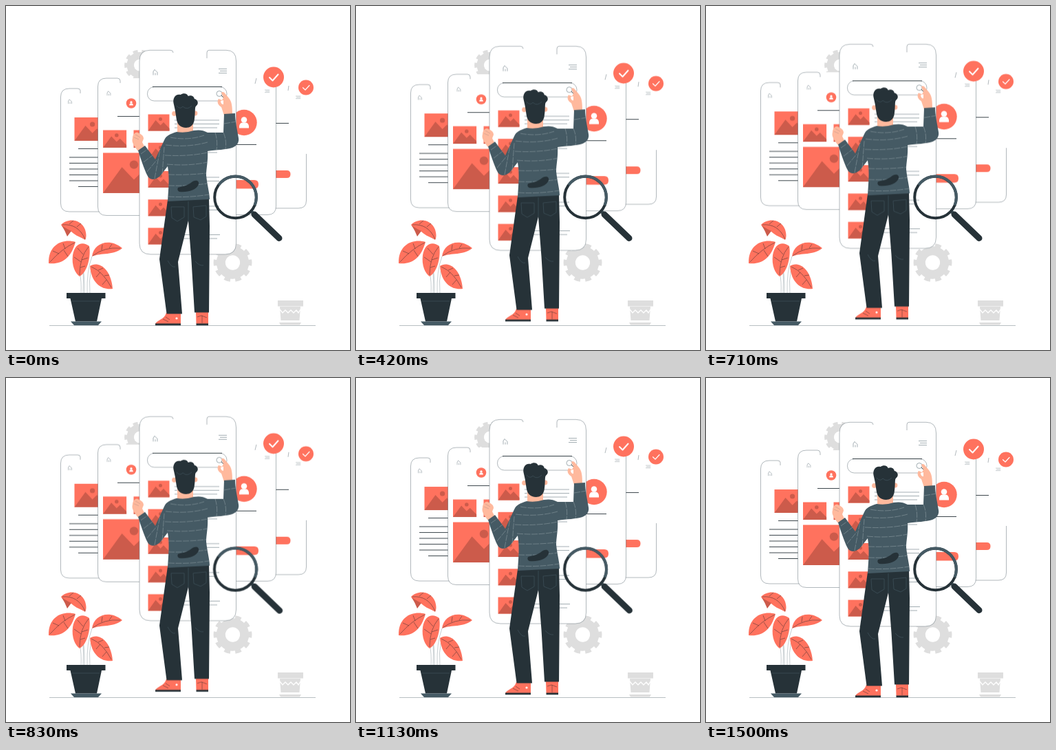
Animation of 500 by 500 pixels, one loop 1540 ms. Source, as an HTML page:

```html
<!DOCTYPE html>
<html lang="en">
<head>
<meta charset="utf-8">
<title>App screens</title>
<style>
  html, body { margin: 0; width: 100%; height: 100%; overflow: hidden; background: #fff; }
  svg { display: block; width: 100vw; height: 100vh; }
  .coral { fill: #ff725e; }
  .shade { fill: #cc5b4b; }
  .dark { fill: #263238; }
  .slate { fill: #455a64; }
  .skin { fill: #ffb99d; }
  .grey { fill: #dedede; }
  .panel { fill: #fff; }
  .edge { fill: none; stroke: #7d898f; stroke-width: .6; }
  .ink { fill: none; stroke: #263238; stroke-width: .9; }
  .thin { fill: none; stroke: #455a64; stroke-width: .5; }
  .vein { fill: none; stroke: #5a3a38; stroke-width: .6; }
  .stripe { fill: none; stroke: #93a1a8; stroke-width: .55; stroke-dasharray: 9 1.5; }
  .seam { fill: none; stroke: #455a64; stroke-width: .6; }
  .check { fill: none; stroke: #fff; stroke-width: 2; stroke-linecap: round; stroke-linejoin: round; }
  .check.small { stroke-width: 1.2; }
  .rim { fill: none; stroke: #263238; stroke-width: 4; }
  .glow { stroke: #455a64; }
  .float { animation: float 1540ms cubic-bezier(.37, 0, .63, 1) -45ms infinite; }
  .lens { transform-origin: 333px 282px; animation: pulse 770ms cubic-bezier(.37, 0, .63, 1) infinite; }
  @keyframes float { 0%, 100% { transform: translateY(0); } 50% { transform: translateY(-8.7px); } }
  @keyframes pulse { 0%, 52%, 100% { transform: scale(1); } 27% { transform: scale(1.05); } }
</style>
</head>
<body>
<svg viewBox="0 0 500 500">
  <defs>
    <g id="gear" fill="none" stroke="#dedede" transform="rotate(-10)">
      <circle r="17.2" stroke-width="13"/>
      <circle r="25.3" stroke-width="5.4" pathLength="20" stroke-dasharray="1.1 .9"/>
    </g>
    <g id="photo">
      <path class="coral" d="M0 0H31V24H0Z"/>
      <path class="shade" d="M0 24L11 8.500L18 16L22.500 11.500L31 20.500V24Z"/>
      <circle class="shade" cx="18" cy="7" r="2.500"/>
    </g>
    <g id="user">
      <circle class="coral" r="18.700"/>
      <circle cy="-4" r="4.300" fill="#fff"/>
      <path d="M-7 8V5Q-6 0 -2 0H2Q6 0 7 5V8Z" fill="#fff"/>
    </g>
    <path id="home" class="thin" d="M-3 4V-1L-1-4L3 0V4M0 4V1"/>
    <path id="menu" class="thin" d="M0 0H12M2 3H12M0 6H12"/>
  </defs>

  <use href="#gear" transform="translate(194.500 86) scale(.8)"/>
  <use href="#gear" transform="translate(329.500 373)"/>

  <!-- floor and grey pot -->
  <path d="M63 464.500H450" stroke="#9aa4a8" stroke-width=".7"/>
  <path class="grey" d="M395 428H432V436.500H395ZM398 437H428L426.500 457H399.500ZM397 460H429L427 463.500H399Z"/>
  <path d="M398 441l4 5 4-4 4 4 4-4 4 4 4-4 3 4 3-5" fill="none" stroke="#fff" stroke-width="1.300"/>

  <!-- plant -->
  <g>
    <path class="thin" stroke-opacity=".6" d="M109 418Q110 400 107 388M114 418Q115 390 109 366M118 418Q117 385 125 364M122 418Q120 400 124 380M112 418Q113 400 112 385"/>
    <path class="coral" d="M80 318C89 309 108 308 115 325C117 332 117 336 115 340C109 336 101 334 95 328L82 321Z"/>
    <path class="shade" d="M81 319Q90 325 95 327L89 335Q86 327 81 319Z"/>
    <path class="coral" d="M101 343C85 338 61 345 62 374C80 376 94 368 101 343Z"/>
    <path class="coral" d="M125 364C127 345 150 336 169 352C155 363 140 358 125 364Z"/>
    <path class="coral" d="M121 349C112 342 100 344 97 362C95 378 101 389 107 393C117 388 124 366 121 349Z"/>
    <path class="coral" d="M122 378C132 371 152 378 155 411C140 413 124 404 122 378Z"/>
    <path class="vein" d="M82 318Q105 316 115 339M92 317L98 312M103 321L109 316M100 344Q82 352 64 372M86 353L83 345M77 360L68 356M84 355L90 364M126 363Q143 350 166 352M139 355L140 347M150 352L154 346M120 350Q107 365 107 391M112 361L104 352M109 372L99 365M110 369L119 366M108 380L115 378M124 379Q141 386 153 409M134 384L141 381M143 392L150 391M137 387L131 394M146 398L140 405"/>
    <path class="dark" d="M88 417H144.500V425H88ZM93.500 425H139L132 458.500H101Z"/>
    <path class="seam" d="M96 429H136"/>
    <path class="slate" d="M94 458.500H139L134 464H99Z"/>
  </g>

  <g class="float">
    <!-- right screens -->
    <path class="panel" d="M380 116H436V283Q436 294 425 294H380Z"/>
    <path class="edge" d="M436.500 215V283Q436.500 294 425 294H392M411 116L410 123"/>
    <path class="ink" d="M392 170.500H411"/>
    <path class="coral" d="M392 239H408Q413.500 239 413.500 244.500T408 250H392Z"/>
    <use href="#menu" transform="translate(421 131) scale(.6)"/>

    <path class="panel" d="M320 104H392V291Q392 303.500 380 303.500H320Z"/>
    <path class="edge" d="M392.500 113V291Q392.500 303.500 380 303.500H320M364 105L362 113"/>
    <path class="ink" d="M330 201.500H364"/>
    <path class="coral" d="M330 253H361Q367 253 367 259.300T361 265.500H330Z"/>
    <use href="#menu" transform="translate(376 122) scale(.6)"/>
    <use href="#user" x="346" y="169.500"/>

    <!-- left screens -->
    <path class="panel" d="M140 120H92Q80 120 80 132V287Q80 299 92 299H140Z"/>
    <path class="edge" d="M108 127V123Q108 120 104 120H92Q79.500 120 79.500 132V287Q79.500 299 92 299H140"/>
    <use href="#home" transform="translate(93 139) scale(.8)"/>
    <use href="#photo" transform="translate(99.500 162) scale(1.450 1.420)"/>
    <path class="ink" d="M105 207.500H134M92 220H134M92 228.500H134M92 237H134M92 245.500H134M92 254H134M105 262.500H134"/>

    <path class="panel" d="M200 105H146Q134 105 134 117V292Q134 304.500 146 304.500H200Z"/>
    <path class="edge" d="M166 112V109Q166 105 162 105H146Q133.500 105 133.500 117V292Q133.500 304.500 146 304.500H200"/>
    <use href="#home" transform="translate(149.500 127) scale(.8)"/>
    <use href="#user" transform="translate(182 141.500) scale(.39)"/>
    <path class="ink" d="M162 160.500H196"/>
    <use href="#photo" transform="translate(141 180.500) scale(1.100 1.060)"/>
    <use href="#photo" transform="translate(185.500 180.500) scale(1.100 1.060)"/>
    <use href="#photo" transform="translate(141 213.500) scale(2.500 2.440)"/>

    <!-- main screen -->
    <rect class="panel" x="194" y="64.300" width="140.500" height="296.700" rx="15"/>
    <path class="edge" d="M243 68Q243 64.300 239 64.300H209Q194 64.300 194 80V345Q194 361 210 361H318.500Q334.500 361 334.500 345V80Q334.500 64.300 320 64.300H295Q292 64.300 292 68V76"/>
    <use href="#home" x="217" y="96.500"/>
    <use href="#menu" x="309" y="91.500"/>
    <rect class="edge" x="205.500" y="117.500" width="115.500" height="20.500" rx="10"/>
    <path class="ink" d="M213 117.500H314"/>
    <circle class="thin" cx="310" cy="127.500" r="4"/>
    <path class="ink" d="M313 130L317 134"/>
    <use href="#photo" x="206.500" y="157.500"/>
    <use href="#photo" x="206.500" y="198.800"/>
    <use href="#photo" x="206.500" y="240"/>
    <use href="#photo" x="206.500" y="281.300"/>
    <use href="#photo" x="206.500" y="322.500"/>
    <path class="thin" d="M245 166H310M245 171.500H310M245 177H307M245 207.500H307M245 213H307M245 249H310M245 254.500H310M245 291H310M245 296.500H307M245 332.500H311M245 338H307"/>

    <!-- badges -->
    <circle class="coral" cx="389" cy="103.500" r="15"/>
    <path class="check" d="M383 104L387.500 108.500L395.500 99.500"/>
    <circle class="coral" cx="436" cy="118.500" r="11"/>
    <path class="check small" d="M431.500 118.700L435 122L441 115.500"/>

    <!-- man -->
    <path class="coral" d="M233 446H254V462H217C220 456 230 456 233 446ZM276 445H294V462H276.500Z"/>
    <path class="dark" d="M217 461.500H254V464.300H217ZM276.500 461.500H294V464.300H276.500Z"/>
    <path class="vein" d="M228 455L236 459M232 452L238 456M278 452L284 450L292 453M285 450V461"/>
    <circle cx="248" cy="454" r="1.600" fill="#fff"/>
    <path class="dark" d="M235 282L295 280L296 320L295 445.500H274L269.500 370L265 312L250 372L256 447.500H233.500L223 368L229 325Z"/>
    <path class="seam" d="M240 292H259V307L249 313L241 308ZM272 292L291 290V306L283 311L273 307ZM265 284V312M235 370Q241 381 246 379M275 371Q281 378 287 377"/>

    <path class="skin" d="M192 211C186 203 182 198 184 192C184 187 188 183 191 184C196 186 200 188 200 193L198 198L202 206Z"/>
    <path class="thin" stroke-opacity=".4" d="M186 191L193 194M188 187L195 191"/>
    <path class="skin" d="M317 159L313 147C308 144 306 139 309 135L314 137L316 133L313 126Q316 123 319 128L324 134C328 139 329 145 329 158Z"/>
    <path class="panel" d="M312 138L316 137L316 143Q312 143 312 138Z"/>

    <path class="skin" d="M249 166H272V183Q261 189 249 184Z"/>
    <path class="slate" d="M248 183C239 186 233 188 230 195L217 223L202 203L192 210C197 226 203 243 207 249C212 254 219 252 224 247L235 233C238 250 236 267 235 284L296 281C296 272 292 258 291 246C291 236 294 225 293 211C306 209 320 209 329 206C336 203 339 198 338 192C336 179 333 168 333 156L317 157L316 184H293C286 180 280 180 273 181Q261 185 248 183Z"/>
    <path class="stripe" d="M239 191Q265 196 288 188M232 202Q265 206 293 198M231 217Q265 219 293 213M234 230Q265 233 293 227M236 245Q265 246 291 243M236 261Q265 262 293 258M236 277Q265 279 295 274M196 215L206 208M200 227L213 217M205 241L219 224M216 251L224 208M227 245L230 205M304 184Q308 196 306 209M316 184Q321 195 319 208M317 171L335 168"/>
    <path class="dark" d="M250 264C258 262 264 261 270 256C276 252 281 254 280 259C277 268 264 271 252 270Q248 268 250 264Z"/>
    <circle class="skin" cx="244.500" cy="156.500" r="3.400"/>
    <circle class="skin" cx="275" cy="156" r="3.400"/>
    <path class="dark" transform="translate(.7)" d="M243 142C241 134 246 127 253 129C257 126 263 127 264 131C269 129 273 132 273 135C278 136 280 142 276 145C273 147 275 153 273 166C272 174 266 177 261 177C253 177 248 172 247 164L245 151Z"/>
    <path class="seam" d="M248 145Q253 151 257 146Q263 152 270 145"/>
  </g>

  <g class="lens">
    <path d="M357 299L362 304" stroke="#455a64" stroke-width="5"/>
    <path d="M361 303L397 337.500" stroke="#263238" stroke-width="9" stroke-linecap="round"/>
    <circle class="rim" cx="333.500" cy="278" r="30.300"/>
    <path class="rim glow" d="M309 260.100A30.300 30.300 0 0 1 361.500 289.600"/>
  </g>
</svg>
</body>
</html>
```
